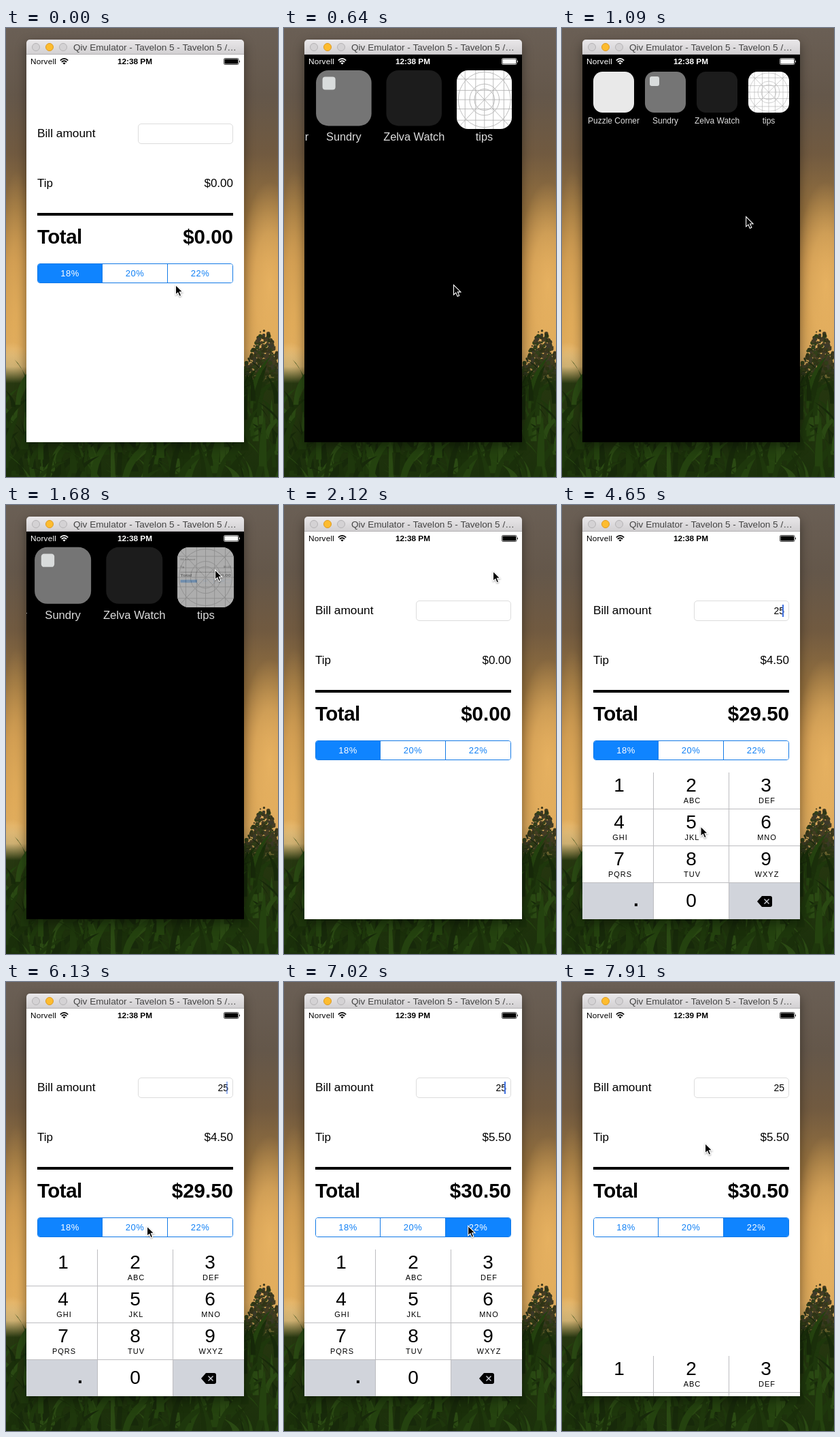
Recreate the animation shown at these times as an HTML page with a canvas. Size 400x658 px, loop 8 s.

```html
<!DOCTYPE html>
<html lang="en">
<head>
<meta charset="utf-8">
<title>Tip calculator</title>
<style>
html, body { margin: 0; width: 100%; height: 100%; overflow: hidden; background: #1a2d0a; }
body { position: relative; font-family: "Liberation Sans", Arial, sans-serif; color: #000; }
body div, canvas, svg, .abs { position: absolute; box-sizing: border-box; white-space: nowrap; }
#wall { left: 0; top: 0; }
#win { left: 30px; top: 17px; width: 320px; height: 590px; border-radius: 5px 5px 0 0;
  box-shadow: 0 6px 16px rgba(0,0,0,.42); }
#bar { width: 320px; height: 22px; border-radius: 5px 5px 0 0; background: linear-gradient(#eae8ea, #d2d0d2);
  border-bottom: 1px solid #b4b2b4; font-size: 13.6px; line-height: 23px; color: #444; }
#bar span { left: 69px; }
#bar i { position: absolute; top: 5px; width: 12px; height: 12px; border-radius: 50%; box-sizing: border-box;
  background: #d4d2d4; border: 1px solid #b5b3b5; }
#bar i.on { background: #fdbc2f; border-color: #dd9a23; }
#screen { top: 22px; width: 320px; height: 568px; background: #000; overflow: hidden; }
#home { width: 320px; height: 568px; transform-origin: 0 0; color: #ddd; font-size: 12px; }
#home b { position: absolute; top: 25px; width: 60px; height: 60px; border-radius: 13.5px; }
#home span { position: absolute; top: 90px; width: 100px; line-height: 14px; text-align: center; }
#home u { position: absolute; left: 7px; top: 7px; width: 13.5px; height: 13.5px; border-radius: 3px; background: #d9dcdc; }
#tile { overflow: hidden; background: #fff; }
#tile > svg { width: 100%; height: 100%; }
#app { width: 320px; height: 568px; background: #fff; transform-origin: 0 0; overflow: hidden; }
#shade { inset: 0; background: #000; }
.mid { transform: translateY(-50%); line-height: 1; }
.t17 { font-size: 17px; }
.big { font-size: 29.5px; font-weight: bold; top: 266.75px; }
#field { left: 164px; top: 101px; width: 140px; height: 30px; border: 1px solid #dcdcdc; border-radius: 5px; }
#bill { right: 6px; top: 14px; font-size: 14px; }
#caret { right: 7px; top: 5px; width: 2px; height: 18px; background: #3f70e0; }
#rule { left: 16px; top: 232px; width: 288px; height: 4px; background: #000; }
#seg { left: 16px; top: 306px; width: 288px; height: 29px; border: 1px solid #1279e6; border-radius: 4px; overflow: hidden; }
#seg div { top: 0; width: 96px; height: 27px; line-height: 27px; text-align: center; font-size: 13px;
  letter-spacing: .5px; color: #1180f5; background: #fff; }
#seg div:first-child { width: 94px; }
#seg div + div { border-left: 1px solid #1279e6; }
#seg div.on { background: #0f84ff; color: #fff; }
#pad { top: 353px; width: 320px; height: 216px; background: #fff; }
#pad .key { height: 54px; text-align: center; border: 0 solid #bdbdc0; }
#pad .key.dark, #pad .key.down { background: #d1d4db; }
#pad span { position: absolute; left: 0; right: 0; font-size: 28px; line-height: 28px; }
#pad small { position: absolute; left: 1px; right: 0; top: 35px; font-size: 11px; line-height: 12px; letter-spacing: 1px; }
#status { top: 0; width: 320px; height: 20px; line-height: 21px; }
#status .net { left: 6px; font-size: 11.8px; letter-spacing: .2px; }
#clock { left: 0; width: 319px; text-align: center; font-size: 11.8px; font-weight: bold; }
#cursor { left: 0; top: 0; overflow: visible; filter: drop-shadow(0 1px 1px rgba(0,0,0,.35)); }
</style>
</head>
<body>
<canvas id="wall" width="400" height="658"></canvas>
<div id="win">
  <div id="bar">
    <i style="left:8px"></i><i class="on" style="left:28px"></i><i style="left:48px"></i>
    <span class="abs">Qiv Emulator - Tavelon 5 - Tavelon 5 /…</span>
  </div>
  <div id="screen">
    <div id="home"></div>
    <div id="tile">
      <svg viewBox="0 0 60 60" preserveAspectRatio="none" fill="none" stroke="#b0b0b0" stroke-width=".6">
        <path d="M9 0V60M20.5 0V60M30 0V60M39.5 0V60M51 0V60M0 9H60M0 20.5H60M0 30H60M0 39.5H60M0 51H60M0 0L60 60M60 0L0 60"/>
        <circle cx="30" cy="30" r="28.3"/><circle cx="30" cy="30" r="16"/><circle cx="30" cy="30" r="11"/>
      </svg>
      <div id="app">
        <div class="mid" style="left:16px;top:116px;font-size:17.3px">Bill amount</div>
        <div id="field"><div class="mid" id="bill"></div><div id="caret"></div></div>
        <div class="mid t17" style="left:16px;top:187.5px">Tip</div>
        <div class="mid t17" id="tip" style="right:16px;top:187.5px"></div>
        <div id="rule"></div>
        <div class="mid big" style="left:16px;letter-spacing:-.5px">Total</div>
        <div class="mid big" id="total" style="right:16px"></div>
        <div id="seg"></div>
        <div id="pad"></div>
      </div>
      <div id="shade"></div>
    </div>
    <div id="status">
      <div class="net">Norvell</div>
      <svg style="left:49px;top:5px" width="13" height="10" fill="none" stroke="currentColor" stroke-width="1.7">
        <path d="M.8 3.6Q6.5-1.8 12.2 3.6M2.8 5.9Q6.5 2.2 10.2 5.9"/>
        <path d="M4.4 7.4Q6.5 5.6 8.6 7.4L6.5 9.6Z" fill="currentColor" stroke="none"/>
      </svg>
      <div id="clock"></div>
      <svg style="left:290px;top:5px" width="25" height="10" fill="currentColor">
        <rect x=".5" y=".5" width="21.5" height="9" rx="1.6" fill="none" stroke="currentColor" stroke-width=".7"/>
        <rect x="1.5" y="1.5" width="19.5" height="7" rx=".8"/><path d="M23 3.2Q25 5 23 6.8Z"/>
      </svg>
    </div>
  </div>
</div>
<svg id="cursor" width="12" height="18">
  <path d="M0 0V14.4L3.3 11.4L5.6 16.8L8.2 15.7L5.9 10.4H10.4Z" stroke="#fff" stroke-width="1.1"/>
</svg>
<script>
const $ = id => document.getElementById(id);
const LOOP = 8000, START = 484, BEAT = 148.2;

function add(parent, tag, html = '', css = '', cls = '') {
  const el = document.createElement(tag);
  el.innerHTML = html;
  el.style.cssText = css;
  el.className = cls;
  return parent.appendChild(el);
}

// Home screen icons
[['Puzzle Corner', '#e9e9e9'], ['Sundry', '#757575'], ['Zelva Watch', '#1c1c1c'], ['tips', '']].forEach(([name, color], i) => {
  const x = 16 + 76 * i;
  if (color) add($('home'), 'b', name === 'Sundry' ? '<u></u>' : '', `left:${x}px;background:${color}`);
  add($('home'), 'span', name, `left:${x - 20}px`);
});

const rates = [18, 20, 22];
const segs = rates.map((r, i) => add($('seg'), 'div', r + '%', `left:${96 * i - (i ? 2 : 0)}px`));

// Number pad
const erase = '<svg style="left:41px;top:19px" width="22" height="16"><path d="M7 0H19Q22 0 22 3V13Q22 16 19 16H7L0 8Z"/>' +
  '<path d="M10.5 4.5L17.5 11.5M17.5 4.5L10.5 11.5" stroke="#d1d4db" stroke-width="1.4"/></svg>';
const colX = [0, 105, 216, 320];
const letters = ['', 'ABC', 'DEF', 'GHI', 'JKL', 'MNO', 'PQRS', 'TUV', 'WXYZ'];
const keys = [];
for (let i = 0; i < 12; i++) {
  const c = i % 3, r = Math.floor(i / 3);
  const nudge = c === 1 ? 0 : 4;
  let html = `<span style="left:${nudge}px;top:${r < 3 ? 5 : 12}px">${r < 3 ? i + 1 : 0}</span>`;
  if (r < 3) html += `<small style="left:${nudge + 3}px">${letters[i]}</small>`;
  if (i === 9) html = '<span style="left:75px;right:auto;top:11px;font-weight:bold">.</span>';
  if (i === 11) html = erase;
  keys.push(add($('pad'), 'div', html,
    `left:${colX[c]}px;top:${54 * r}px;width:${colX[c + 1] - colX[c]}px;` +
    `border-right-width:${c < 2 ? 1 : 0}px;border-bottom-width:${r < 3 ? 1 : 0}px`,
    'key' + (i === 9 || i === 11 ? ' dark' : '')));
}

// Sunset, tree and grass behind the window
function paintWall() {
  const g = $('wall').getContext('2d');
  let seed = 11;
  const rnd = () => (seed = (seed * 16807) % 2147483647) / 2147483647;
  const fill = (grad, stops) => {
    stops.forEach(([p, c]) => grad.addColorStop(p, c));
    g.fillStyle = grad;
    g.fillRect(0, 0, 400, 658);
  };
  const glow = (x, y, rx, ry, rgb, a) => {
    g.save();
    g.translate(x, y);
    g.scale(rx, ry);
    const grad = g.createRadialGradient(0, 0, 0, 0, 0, 1);
    grad.addColorStop(0, `rgba(${rgb},${a})`);
    grad.addColorStop(.5, `rgba(${rgb},${a * .7})`);
    grad.addColorStop(1, `rgba(${rgb},0)`);
    g.fillStyle = grad;
    g.fillRect(-1, -1, 2, 2);
    g.restore();
  };
  fill(g.createLinearGradient(0, 0, 0, 658), [[0, '#6a5f55'], [.15, '#64574a'], [.28, '#715a40'],
    [.4, '#94703e'], [.52, '#bb8946'], [.66, '#cf9b50'], [.78, '#d9ab63']]);
  glow(16, 420, 30, 210, '238,184,98', .6);
  glow(8, 500, 30, 40, '244,216,160', .6);
  glow(388, 375, 45, 150, '242,188,104', .75);

  const blobs = ['#3a361b', '#463d24', '#2f3416', '#3d3a2a', '#33401a'];
  for (let i = 0; i < 620; i++) {
    const d = Math.sqrt(rnd()) * 85;
    g.fillStyle = blobs[i % 5];
    g.beginPath();
    g.arc(380 + (rnd() * 2 - 1) * (5 + d * .45), 443 + d, 1 + rnd() * 2.2, 0, 7);
    g.fill();
  }
  fill(g.createLinearGradient(0, 470, 0, 658), [[0, 'rgba(28,48,11,0)'], [.14, 'rgba(28,48,11,.15)'],
    [.27, 'rgba(28,48,11,.95)'], [1, '#1b300b']]);
  const greens = ['#1e370c', '#24420f', '#1a2f0a', '#2a4913', '#17290a'];
  for (let i = 0; i < 300; i++) {
    const x = rnd() * 440 - 20, y = 545 + rnd() * 140, h = 30 + rnd() * 50;
    const lean = (rnd() - .5) * 110, w = 2 + rnd() * 4;
    g.fillStyle = greens[Math.floor(rnd() * greens.length)];
    g.beginPath();
    g.moveTo(x - w, y);
    g.quadraticCurveTo(x - w, y - h * .7, x + lean, y - h);
    g.quadraticCurveTo(x + w, y - h * .5, x + w, y);
    g.fill();
  }
}

// Linear track through [beat, value...] points
function track(n, pts) {
  if (n <= pts[0][0]) return pts[0].slice(1);
  for (let i = 1; i < pts.length; i++) {
    const a = pts[i - 1], b = pts[i];
    if (n <= b[0]) return b.slice(1).map((v, k) => a[k + 1] + (v - a[k + 1]) * (n - a[0]) / (b[0] - a[0]));
  }
  return pts[pts.length - 1].slice(1);
}

// beat, zoom of the app, its opacity, icon shade
const zoom = [[-1, 1, 1, 0], [0, .45, .6, 0], [1, .083, 0, 0], [2, .008, 0, 0], [3, 0, 0, 0], [7, 0, 0, 0],
  [8, .0885, .38, .32], [9, .7, 1, 0], [10, .985, 1, 0], [11, 1, 1, 0]];
const pointer = [[1, 249.5, 376.5], [3, 256, 350], [6, 300, 130], [8, 307.5, 95], [10, 307.5, 95], [11, 307.5, 97],
  [12, 307.5, 97], [13, 298, 118], [14, 276, 147], [16, 276, 147], [17, 270.5, 161], [19, 270.5, 161],
  [22, 208, 390], [23, 201, 411], [25, 201, 413], [27, 204, 468], [28, 204, 471], [29, 204, 471],
  [31, 212, 528], [32, 213, 528], [35, 206, 400], [37, 207.5, 358], [39, 207.5, 358],
  [42, 268, 358], [45, 272, 357], [47, 250, 300], [49, 211, 238], [50, 210.5, 236.5]];
const slide = [[16, 216], [17, 180], [18, 25], [19, 1], [20, 0], [48, 0], [49, 40], [50, 156]];

function caretAlpha(n) {
  if (n < 17 || n >= 49) return 0;
  const from = n < 25 ? 17 : n < 27 ? 25 : 27;
  const f = (n - from) * BEAT / 1000 % 1;
  return f < .55 ? 1 : f < .72 ? (.72 - f) / .17 : f < .85 ? 0 : (f - .85) / .15;
}

function draw(t) {
  const n = Math.floor((t - START) / BEAT);
  const [p, alpha, dim] = track(n, zoom);
  const w = 60 + 260 * p, h = w + 248 * Math.pow(p, 1.61), s = w / 60;
  const cx = 274 - 114 * p, top = 25 - 25 * p;
  $('home').style.transform = `translate(${cx - 274 * s}px,${top - 25 * s}px) scale(${s})`;
  const tile = $('tile').style;
  tile.left = cx - w / 2 + 'px';
  tile.top = top + 'px';
  tile.width = w + 'px';
  tile.height = h + 'px';
  tile.borderRadius = 13.5 * s * (1 - p) + 'px';
  $('app').style.transform = `scale(${w / 320},${h / 568})`;
  $('app').style.opacity = alpha;
  $('shade').style.opacity = dim;
  $('status').style.color = p > .5 ? '#000' : '#fff';
  $('clock').textContent = n < 42 ? '12:38 PM' : '12:39 PM';

  const bill = n < 25 ? '' : n < 28 ? '2' : '25';
  const pick = n < 39 ? 0 : n < 43 ? 1 : 2;
  const tip = bill * rates[pick] / 100;
  $('bill').textContent = bill;
  $('tip').textContent = '$' + tip.toFixed(2);
  $('total').textContent = '$' + (tip + +bill).toFixed(2);
  segs.forEach((el, i) => el.classList.toggle('on', i === pick));
  keys[1].classList.toggle('down', n === 24);
  keys[4].classList.toggle('down', n === 27);
  $('pad').style.transform = `translateY(${track(n, slide)[0]}px)`;
  $('caret').style.opacity = caretAlpha(n);

  const [x, y] = track(n, pointer);
  $('cursor').style.transform = `translate(${x}px,${y}px)`;
}

function tick() {
  draw(performance.now() % LOOP);
  requestAnimationFrame(tick);
}
paintWall();
tick();
</script>
</body>
</html>
```
